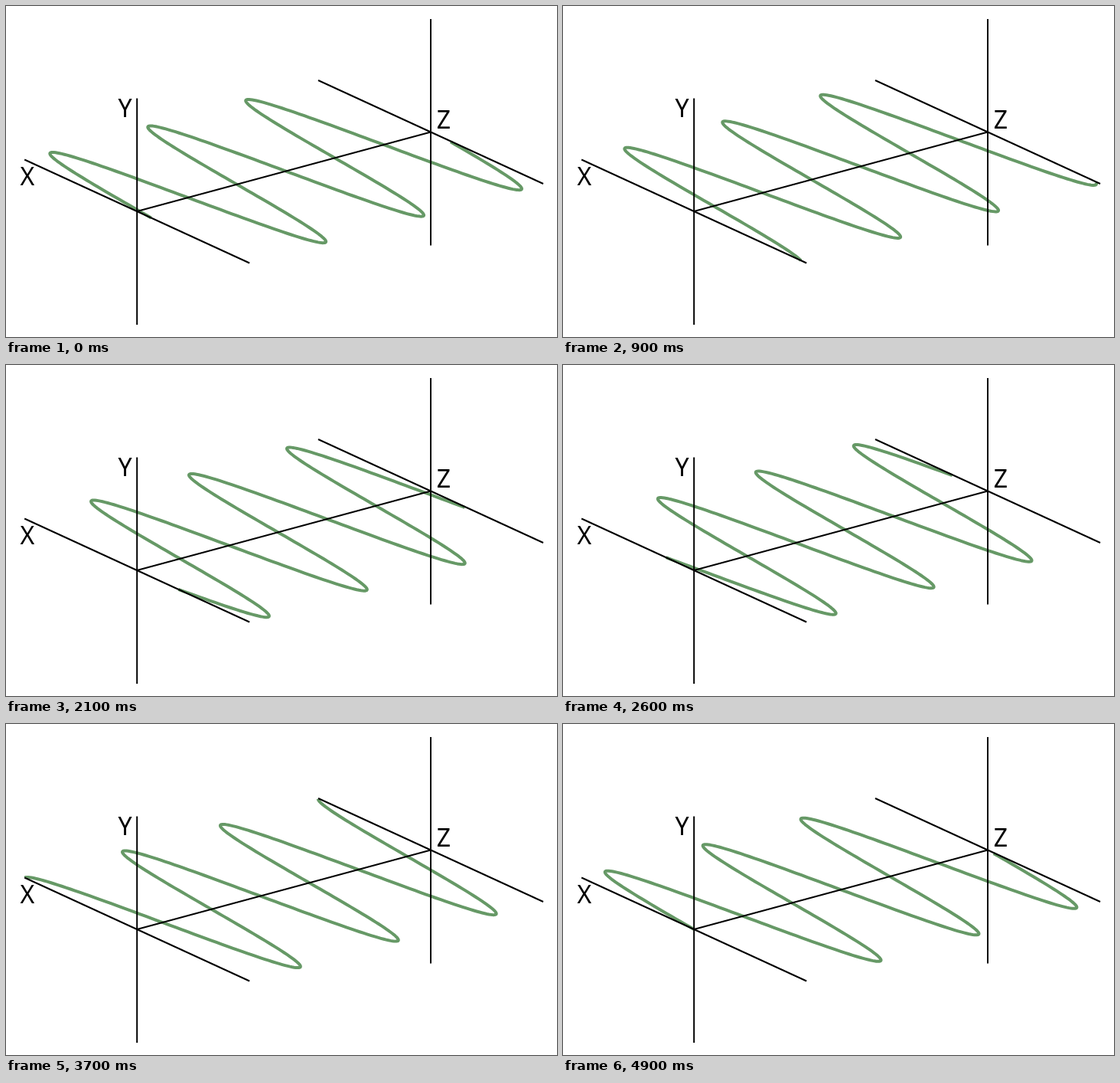
These frames come from a looping animation (720x432 px, 5000 ms). An HTML page with a canvas:

```html
<!DOCTYPE html>
<html lang="en">
<head>
<meta charset="utf-8">
<title>Linearly polarised wave</title>
<style>
html, body { margin: 0; width: 100%; height: 100%; overflow: hidden; background: #fff; }
canvas { display: block; }
</style>
</head>
<body>
<canvas id="stage" width="720" height="432"></canvas>
<script>
const ctx = document.getElementById('stage').getContext('2d');
const LOOP = 5000, STEP = 100;
const WAVES = 3, END = 0.9968, SAMPLES = 400;
const origin = { x: 171.2, y: 268 };
const along = { x: 383.8, y: -103.5 };
const swing = { x: 147, y: 67.5 };

function line(x1, y1, x2, y2) {
  ctx.beginPath();
  ctx.moveTo(x1, y1);
  ctx.lineTo(x2, y2);
  ctx.stroke();
}

function cross(x, y) {
  line(x - swing.x, y - swing.y, x + swing.x, y + swing.y);
  line(x, y - 147.5, x, y + 148);
}

function drawAxes() {
  ctx.strokeStyle = '#000';
  ctx.lineWidth = 2;
  cross(origin.x, origin.y);
  cross(origin.x + along.x, origin.y + along.y);
  line(origin.x, origin.y, origin.x + along.x, origin.y + along.y);
}

function drawWave(turn) {
  ctx.beginPath();
  for (let i = 0; i <= SAMPLES; i++) {
    const u = END * i / SAMPLES;
    const s = Math.sin(2 * Math.PI * (turn - WAVES * u));
    ctx.lineTo(origin.x + u * along.x + s * swing.x,
               origin.y + u * along.y + s * swing.y);
  }
  ctx.strokeStyle = '#669966';
  ctx.lineWidth = 4;
  ctx.lineJoin = 'round';
  ctx.stroke();
}

function drawLabels() {
  ctx.fillStyle = '#000';
  ctx.textAlign = 'center';
  ctx.font = '500 32px "Noto Sans ExtraCondensed", "Noto Sans", "Open Sans", sans-serif';
  ctx.fontStretch = 'extra-condensed';
  ctx.fillText('X', 28, 234);
  ctx.fillText('Y', 155.5, 145);
  ctx.fillText('Z', 572, 160);
}

function draw(ms) {
  const t = Math.floor((ms % LOOP) / STEP) * STEP;
  ctx.clearRect(0, 0, 720, 432);
  drawWave((t + STEP) / LOOP);
  drawAxes();
  drawLabels();
}

const start = performance.now();
function tick() {
  draw(performance.now() - start);
  requestAnimationFrame(tick);
}
tick();
</script>
</body>
</html>
```
